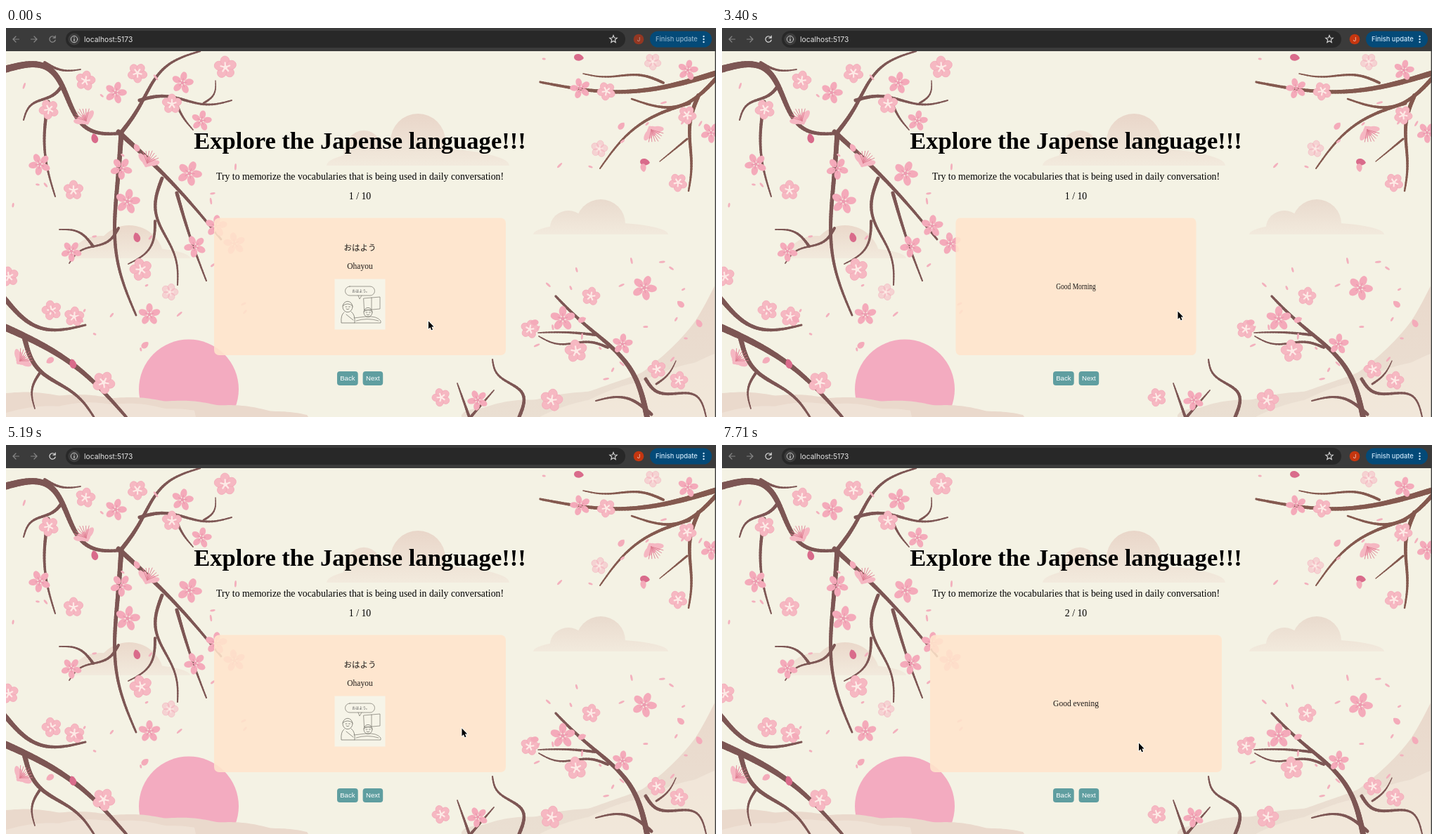
Recreate the animation shown at these times as an HTML page with a canvas. Size 1010x554 px, loop 8000 ms.

```html
<!DOCTYPE html>
<html lang="en">
<head>
<meta charset="utf-8">
<title>Flashcards</title>
<style>
html, body { margin: 0; width: 100%; height: 100%; overflow: hidden; background: #f4f2e4; }
canvas { display: block; width: 1010px; height: 554px; }
</style>
</head>
<body>
<canvas id="stage" width="1010" height="554"></canvas>
<script>
const W = 1010, H = 554, LOOP = 8000, STEP = 148.2, MID = 503.5, TAU = Math.PI * 2;
const PAPER = '#f4f2e4';
const SERIF = '"Liberation Serif", "Times New Roman", serif';
const SANS = '"Liberation Sans", Arial, sans-serif';
const UI = 'Inter, Roboto, sans-serif';
const KANA = '"Noto Sans CJK JP", "Noto Sans CJK", sans-serif';

const view = document.getElementById('stage').getContext('2d');
const scene = document.createElement('canvas');
scene.width = W;
scene.height = H;
let g = scene.getContext('2d');

let seed = 11;
function rand(lo, hi) {
  seed = (seed * 16807) % 2147483647;
  return lo + (hi - lo) * seed / 2147483647;
}

function label(str, x, y, font, color, align = 'center') {
  g.font = font;
  g.fillStyle = color;
  g.textAlign = align;
  g.fillText(str, x, y);
}

function box(x, y, w, h, r, color) {
  g.fillStyle = color;
  g.beginPath();
  g.roundRect(x, y, w, h, r);
  g.fill();
}

function oval(x, y, rx, ry, fill, turn = 0, stroke = null) {
  g.beginPath();
  g.ellipse(x, y, rx, ry, turn, 0, TAU);
  paint(fill, stroke, .8);
}

function paint(fill, stroke, width, path) {
  const args = path ? [path] : [];
  if (fill) { g.fillStyle = fill; g.fill(...args); }
  if (stroke) { g.strokeStyle = stroke; g.lineWidth = width; g.stroke(...args); }
}

function shape(d, fill, stroke, width = 1) {
  paint(fill, stroke, width, new Path2D(d));
}

function at(x, y, turn, drawing) {
  g.save();
  g.translate(x, y);
  g.rotate(turn);
  drawing();
  g.restore();
}

function fade(y0, y1, top, bottom) {
  const f = g.createLinearGradient(0, y0, 0, y1);
  f.addColorStop(0, top);
  f.addColorStop(1, bottom);
  return f;
}

// Tapering limb: a straight run pushed sideways by one bow and one S-shaped sway
function limb(width, x0, y0, x1, y1, bow = 0, sway = 0) {
  const dx = x1 - x0, dy = y1 - y0, len = Math.hypot(dx, dy);
  const point = u => {
    const off = (bow * Math.sin(Math.PI * u) + sway * Math.sin(TAU * u)) / len;
    return [x0 + dx * u - dy * off, y0 + dy * u + dx * off];
  };
  const n = Math.ceil(len / 4);
  for (let i = 0; i < n; i++) {
    g.lineWidth = width * (1 - .6 * i / n);
    g.beginPath();
    g.moveTo(...point(i / n));
    g.lineTo(...point((i + 1) / n));
    g.stroke();
  }
}

function petal(x, y, len, turn, color) {
  at(x, y, turn, () => shape(
    `M0 ${-len}C${len} ${-len * .4} ${len * .8} ${len} 0 ${len}C${-len * .8} ${len} ${-len} ${-len * .4} 0 ${-len}`, color));
}

// Five petals: 'open' has a pale star heart, 'solid' a deep one, 'pale' is faint
function flower(kind, r, x, y) {
  const solid = kind === 'solid';
  at(x, y, (x * 7 + y * 3) % 13 / 10, () => {
    if (kind === 'pale') g.globalAlpha = .55;
    for (let i = 0; i < 5; i++) {
      g.rotate(TAU / 5);
      if (solid) oval(0, -r * .62, r * .31, r * .44, '#f4aaba');
      else oval(0, -r * .58, r * .4, r * .42, '#f6b8c2', 0, '#f3abb9');
    }
    for (let i = 0; i < 5; i++) {
      g.rotate(TAU / 5);
      shape(`M0 0V${-r * .42}`, null, solid ? '#e995aa' : '#fdeae6', solid ? 1 : 2.2);
    }
    oval(0, 0, r * .16, r * .16, solid ? '#ec9bb0' : '#fdeae6');
  });
}

function blooms(kind, r, ...spots) {
  for (const [x, y] of spots) flower(kind, r, x, y);
}

// Half-open blossom seen from the side
function spray(x, y, turn) {
  at(x, y, turn, () => {
    for (let i = -2; i <= 2; i++) oval(i * 4.5, 4 - Math.abs(i), 4, 8, '#f5b7c2', i * .5);
    for (let i = -3; i <= 3; i++) shape(`M0 6L${i * 4} ${-13 + Math.abs(i) * 2}`, null, '#de7d91', .8);
  });
}

// Dome with a wide skirt and a smaller dome beside it, cut flat at the base
function cloud(x, base, half, r, rise, side, color) {
  g.save();
  g.beginPath();
  g.rect(0, 0, W, base);
  g.clip();
  const tone = fade(base - rise, base, color, '#f2eadd');
  oval(x, base, half, rise * .34, tone);
  oval(x + side, base - rise * .18, r * .75, rise * .5, tone);
  oval(x, base - rise + r, r, r, tone);
  g.restore();
}

function ridge(x0, x1, height, color) {
  g.beginPath();
  g.moveTo(x0, H);
  for (let x = x0; x <= x1; x += 4) g.lineTo(x, height((x - x0) / (x1 - x0)) - 3 * Math.abs(Math.sin(x / 24)));
  g.lineTo(x1, H);
  paint(color);
}

function land() {
  cloud(586, 196, 130, 39, 74, -77, '#e9d6c9');
  cloud(846, 294, 96, 35, 50, -46, '#e9dacd');
  cloud(175, 328, 87, 50, 47, -40, '#ead8ca');
  ridge(648, W, v => 554 - 45 * Math.sqrt(v) - 143 * v ** 5, fade(366, H, '#ead9cc', '#eadfd2'));
  ridge(760, W, v => 554 - 88 * v, 'rgba(243,234,221,.75)');
  oval(260, 514.5, 71, 71, '#f3abc0');
  ridge(0, 430, v => 520 + 20 * v + 14 * v ** 4, '#ead9cc');
  ridge(0, 270, v => 548 - 12 * Math.sin(Math.PI * v), 'rgba(243,234,222,.6)');
}

function leftTrees() {
  g.strokeStyle = '#7d5654';
  limb(10, -2, 59, 164, 150, -10, -24);
  limb(7, 160, 148, 306, 301, -5);
  limb(6, 163, 150, 276, 33, -17, 6);
  limb(5, 190, 103, 321, 103, 0, -6);
  limb(3, 281, 107, 298, 75, 7);
  limb(4, 240, 101, 266, 145, 3);
  limb(4, 55, 49, 106, 59, 6);
  limb(5, 80, 82, 25, 131, 5, -5);
  limb(5, 60, 105, 70, 240, 10);
  limb(7, 164, 149, 185, 409, 20, -4);
  limb(4, 160, 285, 90, 335, -1, -6);
  limb(4, 124, 311, 76, 287, 9);
  limb(5, 222, 214, 244, 366, 9, 9);
  limb(5, 243, 235, 285, 360, 2);
  limb(4, 212, 275, 174, 336, -14);
  limb(7, -2, 385, 113, 423, 24);
  limb(10, -2, 426, 171, 554, -15);
  limb(7, 26, 440, 125, 554, 9, 8);
  limb(4, 49, 490, 41, 542, 8);
}

function rightTrees() {
  g.strokeStyle = '#84594f';
  limb(8, 1011, 64, 760, 77, -20);
  limb(4, 935, 78, 821, 65, 4, 4);
  limb(6, 1011, 71, 890, 101, -26);
  limb(5, 972, 107, 845, 200, 17);
  limb(6, 985, 96, 971, 232, 5, 4);
  limb(3, 969, 158, 930, 190);
  g.strokeStyle = '#7d5654';
  limb(8, 912, H, 782, 382, 20, 6);
  limb(4, 838, 437, 757, 434, 2);
  limb(4, 856, 455, 758, 439, -2, 5);
  limb(5, 918, 550, 839, 531, 14);
  limb(5, 910, 500, 996, 554, -8, 12);
  limb(3, 925, 507, 953, 474, 4);
  limb(5, 730, H, 692, 472, 11, 10);
  limb(4, 659, H, 642, 506);
  limb(4, 661, H, 694, 516);
}

function blossoms() {
  blooms('open', 14, [113, 75], [187, 64], [61, 116], [236, 108], [96, 231], [65, 402], [97, 411], [4, 354]);
  blooms('open', 16, [312, 56], [192, 344], [139, 505], [811, 460], [776, 530]);
  blooms('open', 13, [854, 90], [969, 124], [956, 220], [926, 486], [957, 502], [619, 526], [832, 382], [745, 429]);
  blooms('solid', 15, [156, 92], [251, 78], [48, 194], [164, 200], [299, 282], [325, 307], [269, 311], [204, 408]);
  blooms('solid', 17, [173, 247], [261, 207], [908, 370], [792, 414]);
  blooms('solid', 14, [278, 132], [93, 318], [970, 60], [817, 86], [1003, 149], [877, 450], [671, 530]);
  blooms('pale', 12, [233, 376], [920, 48], [844, 172]);
  spray(111, 127, -.5);
  spray(203, 187, .4);
  spray(921, 150, 2.6);
  spray(24, 470, .8);
  for (const [x, y] of [[186, 298], [95, 478], [815, 42], [909, 191], [126, 157]])
    petal(x, y, 7, x > 800 ? 1.7 : -.3, '#d96b8b');
}

function scatter(count, x0, y0, x1, y1) {
  for (let i = 0; i < count; i++)
    oval(rand(x0, x1), rand(y0, y1), 1.5, rand(2.5, 5), '#f3b0bd', rand(0, 3));
  for (let i = 0; i < count / 6; i++)
    petal(rand(x0, x1), rand(y0, y1), 6, rand(0, 6), '#f4abba');
}

function paintScene() {
  g.lineCap = 'round';
  g.fillStyle = PAPER;
  g.fillRect(0, 0, W, H);
  land();
  leftTrees();
  rightTrees();
  blossoms();
  scatter(24, 10, 60, 340, 490);
  scatter(8, 765, 40, 990, 235);
  scatter(20, 730, 330, 990, 500);
  label('Explore the Japense language!!!', MID, 172.4, `bold 34.55px ${SERIF}`, '#000');
  label('Try to memorize the vocabularies that is being used in daily conversation!', MID, 216, `13.8px ${SERIF}`, '#000');
}

function star(x, y, r) {
  g.beginPath();
  for (let i = 0; i < 10; i++) {
    const a = i * TAU / 10, d = i % 2 ? r * .44 : r;
    g.lineTo(x + d * Math.sin(a), y - d * Math.cos(a));
  }
  g.closePath();
  paint(null, '#d8d8d8', 1.1);
}

function toolbar(active) {
  g.fillStyle = '#3b3b3b';
  g.fillRect(0, 0, W, 33);
  g.fillRect(1008.6, 0, 1.4, H);
  box(85, 4, 796, 24, 12, '#282828');
  for (const dir of [1, -1])
    at(27 - 13 * dir, 16, dir < 0 ? Math.PI : 0, () => shape('M4.5 0H-4M0 -4L-4 0L0 4', null, '#868686', 1.2));
  at(66, 16, 0, () => shape('M3.3 -2.8A4.2 4.2 0 1 0 4.2 1M4.2 -5V-1.8H1', null, active ? '#dedede' : '#8d8d8d', 1.2));
  oval(97, 16, 8.5, 8.5, '#3c3c3c');
  oval(97, 16, 4.7, 4.7, null, 0, '#e4e4e4');
  shape('M97 15.5V18.6M97 13.2V13.6', null, '#e4e4e4', 1.1);
  label('localhost:5173', 111, 19.6, `10.3px ${UI}`, '#e6e6e6', 'left');
  star(864, 16, 5.5);
  oval(900, 16, 7.3, 7.3, active ? '#c5360f' : '#943722');
  label('J', 900, 19, `8px ${UI}`, active ? '#f7ded6' : '#c4a49b');
  box(916, 4.5, 88, 23, 11.5, '#044a78');
  label('Finish update', 924, 19.4, `500 9.3px ${UI}`, active ? '#cfe8fb' : '#8db2cb', 'left');
  for (const y of [12, 16, 20]) oval(992.5, y, 1.2, 1.2, '#cfe8fb');
}

function bubble(str, y, w, h, size, ink) {
  g.beginPath();
  g.roundRect(MID - w / 2, y - h / 2, w, h, h / 2);
  paint(null, ink, .7);
  label(str, MID + 1, y + size * .35, `${size}px ${KANA}`, '#555');
}

function face(x, y, r, ink) {
  at(x, y, 0, () => {
    oval(0, 0, r, r * 1.1, null, 0, ink);
    shape(`M${-r} ${-r * .2}Q0 ${-r} ${r} ${-r * .2}M-3 0H-1M1.5 0H3.5M-2 3Q0 5 2 3`, null, ink, .8);
  });
}

function morningSketch() {
  const ink = '#77756c';
  box(467.5, 357.5, 72, 72, 0, '#f6f4e8');
  bubble('おはよう。', 374.5, 42, 13, 5, ink);
  shape('M501 381L503 386L506 381M509 385L532 383V400L510 402ZM520 384V401', null, ink, .7);
  face(486, 397, 7, ink);
  shape('M481 405Q476 408 477 420H496Q497 408 491 404M484 408L494 416', null, ink, .8);
  face(515, 405, 6, ink);
  shape('M495 413L512 411Q528 410 533 417V420H496M498 417Q514 412 530 417', null, ink, .7);
}

function eveningSketch() {
  const ink = '#777';
  box(467.5, 357.5, 72, 72, 0, '#fdfdfb');
  bubble('こんばんは。', 368.5, 47, 11, 6, ink);
  for (let i = 0; i < 4; i++) oval(519 + i * 5, 396 - 4 * Math.sin(i), 4, 3.5, '#9b9b98');
  shape('M528 396V402M468 399H479M516 402H539', null, '#9b9b98', 1.4);
  for (const x of [486, 509]) {
    face(x, 386, 6.5, ink);
    at(x, 386, 0, () => shape('M-4 7Q-9 9 -8 22H-5V33H-1V23H1V33H5V22H8Q9 10 4 7L0 12ZM0 12V23', '#ecece9', ink, .8));
  }
}

const words = [
  { kana: 'おはよう', roman: 'Ohayou', meaning: 'Good Morning', sketch: morningSketch },
  { kana: 'こんばんは', roman: 'Gonbanwa', meaning: 'Good evening', sketch: eveningSketch }
];

// CSS "ease" curve, solved by bisection
function ease(x) {
  if (x <= 0 || x >= 1) return x <= 0 ? 0 : 1;
  const bez = (a, b, u) => 3 * a * u * (1 - u) ** 2 + 3 * b * u * u * (1 - u) + u ** 3;
  let lo = 0, hi = 1;
  for (let i = 0; i < 20; i++) {
    const m = (lo + hi) / 2;
    if (bez(.25, .25, m) < x) lo = m; else hi = m;
  }
  return bez(.1, 1, lo);
}

function card(word, turn) {
  const c = Math.cos(turn * Math.PI);
  g.save();
  g.translate(MID, 0);
  g.scale(Math.max(.004, Math.abs(c)), 1);
  g.translate(-MID, 0);
  box(296, 270.5, 415, 195.5, 7.2, 'rgba(255,229,204,.88)');
  const ink = '#1c1a18';
  if (c > 0) {
    label(word.kana, MID, 316.5, `300 11.5px ${KANA}`, ink);
    label(word.roman, MID, 343, `11.5px ${SERIF}`, ink);
    word.sketch();
  } else {
    label(word.meaning, MID, 372, `11.5px ${SERIF}`, ink);
  }
  g.restore();
}

function button(str, x, w, color) {
  box(x, 489, w, 20, 4, color);
  label(str, x + w / 2, 502.3, `9.58px ${SANS}`, '#fff');
}

// Pointer moves: first step, last step, end point
const moves = [
  [5, 7, 575, 383], [8, 11, 498, 472], [11, 14, 615.5, 407], [20, 21, 648.5, 403.5],
  [36, 38, 561, 500], [39, 41, 522, 498], [45, 48, 593, 424.5]
];

function pointer(step) {
  let x = 601, y = 417.5;
  for (const [from, to, endX, endY] of moves) {
    const u = Math.max(0, Math.min(1, (step - from) / (to - from)));
    x += (endX - x) * u;
    y += (endY - y) * u;
  }
  at(x, y, 0, () => {
    const d = 'M0 0V11L2.5 8.7L4.2 12.8L6 12L4.3 8H7.6Z';
    shape(d, null, '#fff', 1.6);
    shape(d, '#000');
  });
}

function draw(now) {
  const step = Math.floor((now % LOOP + 16) / STEP);
  const t = step * STEP;
  const second = step >= 43;
  const flip = start => ease((t - start) / 600);
  const turn = second ? flip(7130) : flip(3105) - flip(4585);
  g.drawImage(scene, 0, 0);
  label(`${second ? 2 : 1} / 10`, MID, 244, `13.8px ${SERIF}`, '#000');
  card(words[second ? 1 : 0], turn);
  button('Back', 471, 29.7, '#5f9ea0');
  button('Next', 507.6, 28.6, step >= 41 && step < 46 ? '#558f91' : '#5f9ea0');
  toolbar(step >= 16);
  pointer(step);
}

paintScene();
g = view;
g.lineCap = 'round';
const begin = performance.now();
function tick() {
  draw(performance.now() - begin);
  requestAnimationFrame(tick);
}
tick();
</script>
</body>
</html>
```
